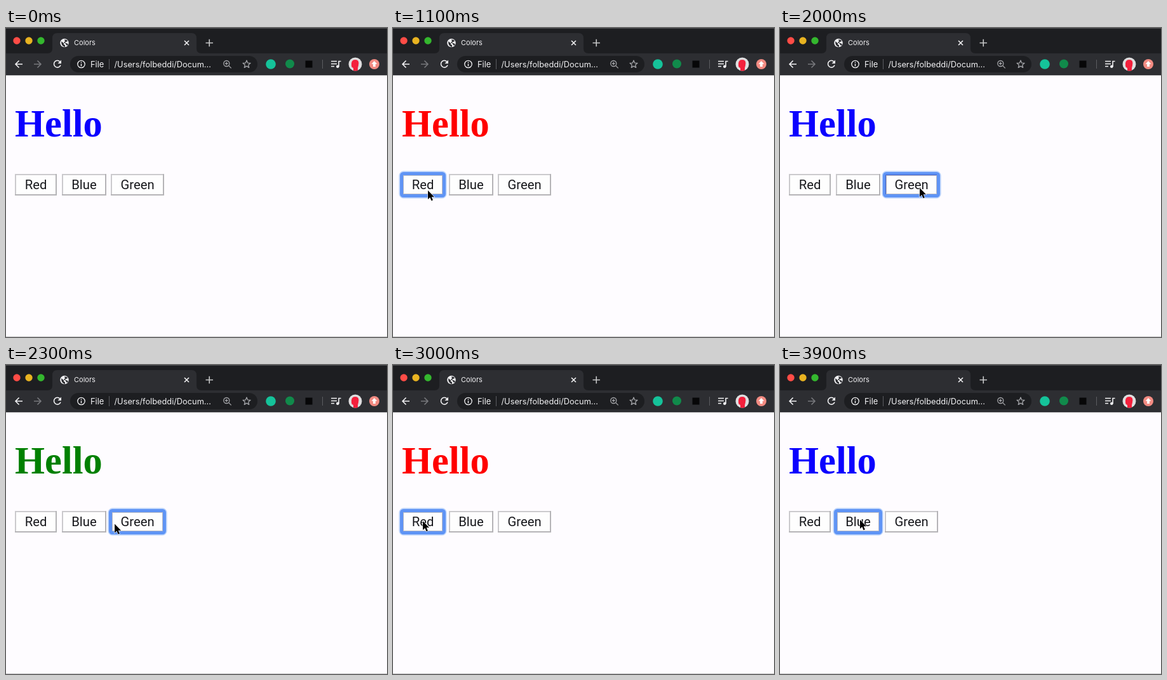
Recreate the animation shown at these times as an HTML page. Size 600 by 487 pixels, loop 4 s.

```html
<!DOCTYPE html>
<html lang="en">
<head>
<meta charset="utf-8">
<title>Colors</title>
<style>
  html, body { margin: 0; width: 100%; height: 100%; overflow: hidden; background: #fefcff; }
  svg { display: block; width: 600px; height: 487px; }
  text { font-family: Inter, Roboto, sans-serif; }
  .line { fill: none; stroke: #f1f1f3; stroke-width: 1.6; }
  #hello { font: bold 60.5px "Liberation Serif", "Times New Roman", serif; }
  .label { font: 20.3px Roboto, Inter, sans-serif; fill: #17181c; text-anchor: middle; }
</style>
</head>
<body>
<svg viewBox="0 0 600 487">
  <rect width="600" height="487" fill="#fefcff"/>

  <!-- Tab strip -->
  <rect width="600" height="40" fill="#1d1e21"/>
  <path d="M0 .5H600" stroke="#4b4c4f"/>
  <path d="M65 40Q73 40 73 32V16Q73 8 81 8H292Q300 8 300 16V32Q300 40 308 40Z" fill="#2d2e32"/>
  <circle cx="17" cy="20" r="5.7" fill="#ff4c46"/>
  <circle cx="36" cy="20" r="5.7" fill="#e8b321"/>
  <circle cx="55" cy="20" r="5.7" fill="#34b72e"/>
  <circle cx="92" cy="23.5" r="6.8" fill="#f1f1f3"/>
  <path d="M87 21l4 3v2l2 1v3q-6-1-6-9zM92 18l4 1 1 2-3 1-1 2h3l2 2-2 2-2-3-3-2 2-2z" fill="#2d2e32"/>
  <text x="107" y="27.3" font-size="11" fill="#f1f1f3">Colors</text>
  <path class="line" d="M281 20l7 7m0-7l-7 7"/>
  <path class="line" d="M314.500 23.500h11.500M320.250 17.800v11.500" stroke-opacity=".8"/>

  <!-- Toolbar -->
  <rect y="40" width="600" height="34" fill="#2d2e32"/>
  <path d="M0 74H600" stroke="#1b1c1f"/>
  <rect x="101" y="44" width="295" height="26" rx="13" fill="#1d1e21"/>
  <path class="line" d="M26 57H15m5.500-5.500L15 57l5.500 5.500"/>
  <path class="line" d="M44 57h11m-5.500-5.500L55 57l-5.500 5.500" style="stroke:#77787c"/>
  <path class="line" d="M85 53.200A5.400 5.400 0 1 0 86 58.500"/>
  <path d="M87 50.500v5.500h-5.500z" fill="#f1f1f3"/>
  <circle class="line" cx="118.500" cy="57" r="5.700" style="stroke-width:1.300"/>
  <path class="line" d="M118.500 56.200v4M118.500 53.500v1.500" style="stroke-width:1.400"/>
  <g font-size="12.9" fill="#f1f1f3">
    <text x="133" y="61.500">File</text>
    <text x="170.500" y="61.500" font-size="12.800">/Users/folbeddi/Docum...</text>
  </g>
  <path d="M162.500 49V65M498.500 50V64" stroke="#5c5d61"/>
  <g class="line" style="stroke:#a5a6aa;stroke-width:1.300">
    <circle cx="347.300" cy="56" r="4.500"/>
    <path d="M350.700 59.400l4 4M345 56h4.600m-2.300-2.300v4.600"/>
    <path id="star" stroke-linejoin="round"/>
  </g>

  <circle cx="417" cy="57" r="7.800" fill="#15c39a"/>
  <circle cx="447" cy="56.500" r="7" fill="#118a4b"/>
  <rect x="471.500" y="51.500" width="11" height="11" fill="#070708"/>
  <path class="line" d="M512 52.500h9M512 56.500h9M512 60.500h5M524 61V52.500h3.500"/>
  <circle cx="522.300" cy="60.800" r="2.300" fill="#f1f1f3"/>
  <circle cx="550" cy="57" r="10.500" fill="#dededf"/>
  <path d="M544 59q-1-9 6-9t5 9l-1 4v4q-4 1-7 0v-4q-3-1-3-4z" fill="#f4203c"/>
  <circle cx="580" cy="57" r="8" fill="#f28b82"/>
  <path d="M580 52l4.500 4.800h-2.600v4.200h-3.800v-4.200h-2.600z" fill="#fff"/>

  <!-- Page -->
  <text id="hello" x="14" y="170.500">Hello</text>
  <g id="buttons"></g>
  <path d="M0 486.500H600" stroke="#c9c8cb"/>
  <path id="cursor" d="M0 0V14L3.300 11 5.500 16.300 7.900 15.300 5.700 10.200H10Z" fill="#000" stroke="#fff" stroke-width="1.100" paint-order="stroke"/>
</svg>
<script>
const $ = id => document.getElementById(id);

$("star").setAttribute("d", "M" + Array.from({ length: 10 }, (_, i) => {
  const r = i % 2 ? 2.8 : 6.3, a = i * Math.PI / 5;
  return `${379 + r * Math.sin(a)} ${57.3 - r * Math.cos(a)}`;
}).join("L") + "Z");

const buttons = [
  { name: "Red", x: 14, w: 66, color: "#ff0000" },
  { name: "Blue", x: 88, w: 70, color: "#0b00ff" },
  { name: "Green", x: 165, w: 84, color: "#008000" },
];

const box = (x, w, grow, attrs) =>
  `<rect x="${x - grow}" y="${230 - grow}" width="${w + 2 * grow}" height="${34 + 2 * grow}" ${attrs}/>`;

$("buttons").innerHTML = buttons.map(({ name, x, w }) => `<g>
  ${box(x, w, 0, 'fill="#fefefe"')}
  <path d="M${x + 1} 264V231H${x + w}" fill="none" stroke="#cbcacd" stroke-width="2"/>
  <path d="M${x} 263H${x + w - 1}V230" fill="none" stroke="#b5b4b7" stroke-width="2"/>
  <g class="ring" fill="none">
    ${box(x, w, 1.2, 'rx="4" stroke="#bfd6fb" stroke-width="7"')}
    ${box(x, w, 0.5, 'rx="3" stroke="#5f94f5" stroke-width="5"')}
    ${box(x, w, -2.5, 'stroke="#b9bac4"')}
  </g>
  <path class="press" d="M${x + 1.5} 262V231.500H${x + w - 2}" fill="none" stroke="#4262cc"/>
  <text class="label" x="${x + w / 2}" y="253.500">${name}</text>
</g>`).join("");

const groups = [...$("buttons").children];

// Cursor stops: time, x, y
const stops = [
  [100, 443, 381], [600, 55, 256], [1200, 55, 256], [1500, 147, 248], [1600, 147, 248],
  [1900, 220, 252], [2100, 220, 252], [2400, 154, 250], [2500, 154, 250],
  [2900, 47, 246], [3100, 47, 246], [3500, 126, 244], [4000, 126, 244],
];

// Mouse down time, mouse up time, button index
const clicks = [
  [800, 900, 0], [1500, 1600, 1], [2000, 2100, 2],
  [2400, 2500, 1], [2900, 3000, 0], [3500, 3600, 1],
];

function cursorAt(t) {
  const i = Math.max(1, stops.findIndex(s => s[0] >= t));
  const [t0, x0, y0] = stops[i - 1], [t1, x1, y1] = stops[i];
  const p = (t - t0) / (t1 - t0), e = p * p * (3 - 2 * p);
  return [x0 + (x1 - x0) * e, y0 + (y1 - y0) * e];
}

function draw(now) {
  const t = Math.floor(now % 4000 / 100) * 100;
  const down = clicks.findLast(c => c[0] <= t);
  const up = clicks.findLast(c => c[1] <= t);
  $("hello").setAttribute("fill", buttons[up ? up[2] : 1].color);
  groups.forEach((g, i) => {
    const focused = down && down[2] === i;
    g.querySelector(".ring").style.display = focused ? "" : "none";
    g.querySelector(".press").style.display = focused && t < down[1] ? "" : "none";
  });
  $("cursor").style.display = t < 100 ? "none" : "";
  if (t >= 100) $("cursor").setAttribute("transform", `translate(${cursorAt(t)})`);
  requestAnimationFrame(draw);
}
requestAnimationFrame(draw);
</script>
</body>
</html>
```
